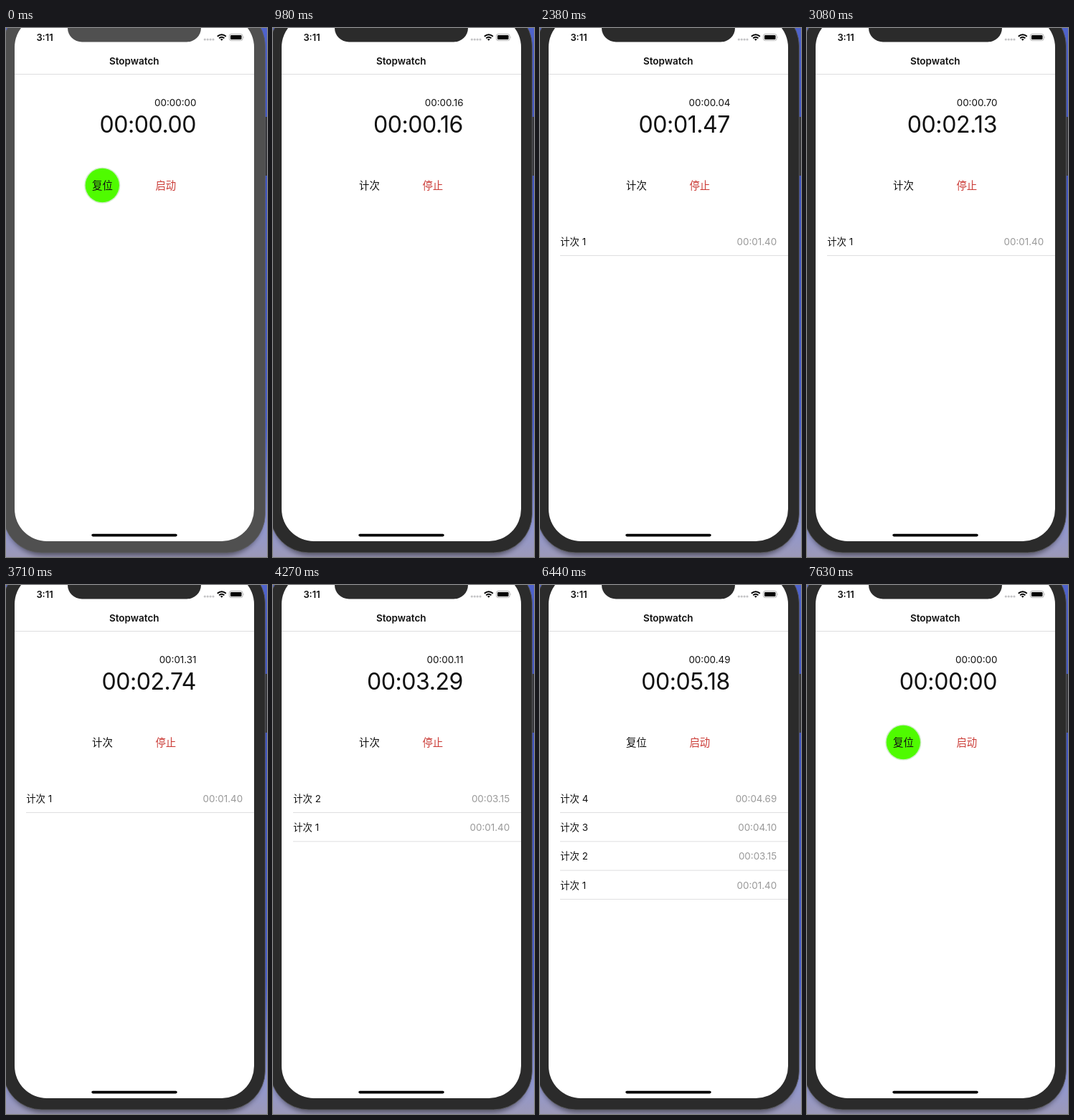
These frames come from a looping animation (364x738 px, 8 s). An HTML page:

```html
<!DOCTYPE html>
<html lang="zh-CN">
<head>
<meta charset="utf-8">
<title>Stopwatch</title>
<style>
  html, body { margin: 0; width: 100%; height: 100%; overflow: hidden; }
  svg { display: block; width: 364px; height: 738px; }
  text { font: 13.4px Inter, "Noto Sans CJK SC", "Noto Sans CJK", sans-serif; fill: #111; }
  .bold { font-weight: 600; text-anchor: middle; }
  .end { text-anchor: end; }
  #total { font-size: 32px; letter-spacing: -.42px; }
  .button { font-size: 14.4px; text-anchor: middle; }
  #right { fill: #cb3b36; }
  .row .end { fill: #999; }
  .line { stroke: #dedee0; stroke-width: 1; }
</style>
</head>
<body>
<svg viewBox="0 0 364 738">
  <defs>
    <linearGradient id="sky" x2="0" y2="1">
      <stop offset="0" stop-color="#4f63cc"/>
      <stop offset=".25" stop-color="#4055c0"/>
      <stop offset=".75" stop-color="#4a60cc"/>
      <stop offset=".94" stop-color="#9097d2"/>
      <stop offset="1" stop-color="#9c99b8"/>
    </linearGradient>
    <filter id="blur"><feGaussianBlur stdDeviation="3.5"/></filter>
  </defs>
  <rect width="364" height="738" fill="url(#sky)"/>
  <rect x="0" y="-20" width="357" height="756" rx="52" opacity=".45" filter="url(#blur)"/>
  <rect x="360" y="124" width="6" height="82" rx="1" fill="#37373b"/>

  <g id="bezel">
    <rect x="-4" y="-29" width="365.4" height="761" rx="54" stroke="#606064" stroke-width=".8"/>
    <rect x="12" y="-18" width="334" height="734" rx="45" fill="#fff"/>
    <path d="M86 -2V0A20 19.5 0 0 0 106 19.5H252A20 19.5 0 0 0 272 0V-2Z"/>
  </g>

  <text class="bold" x="54" y="17.5" style="font-size:12.9px">3:11</text>
  <g fill="#c4c4c6">
    <circle cx="277.3" cy="16" r="1.6"/><circle cx="281.2" cy="16" r="1.6"/>
    <circle cx="285.1" cy="16" r="1.6"/><circle cx="289" cy="16" r="1.6"/>
  </g>
  <g fill="none" stroke="#000" stroke-width="2">
    <path d="M294.8 11.8Q300.8 6.6 306.8 11.8"/>
    <path d="M297.2 14.2Q300.8 11.2 304.4 14.2"/>
  </g>
  <path d="M298.9 15.8Q300.8 14.3 302.7 15.8L300.8 17.8Z"/>
  <rect x="311.5" y="8.5" width="18.5" height="9" rx="2.5" fill="none" stroke="#b0b0b0"/>
  <rect x="313" y="10" width="15.5" height="6" rx="1.2"/>
  <path d="M331 11.5q1.5 1.5 0 3z" fill="#b0b0b0"/>

  <text class="bold" x="178.8" y="51.2" style="font-size:13.5px">Stopwatch</text>
  <path class="line" d="M12 64.5H346"/>

  <text class="end" id="lap" x="265.5" y="109.1"></text>
  <text class="end" id="total" x="265" y="145.6"></text>

  <g id="disc">
    <circle cx="134.3" cy="219.5" r="24.4" fill="none" stroke="#cdebc6" stroke-width="1.4"/>
    <circle cx="134.3" cy="219.5" r="23.7" fill="#4ffb00"/>
  </g>
  <text class="button" id="left" x="134.4" y="225"></text>
  <text class="button" id="right" x="222.8" y="225"></text>

  <g id="rows"></g>
  <rect x="119.3" y="705.7" width="119.4" height="3.7" rx="1.8"/>
</svg>
<script>
  const LOOP = 8000, STEP = 70, START = 805, STOP = 6440, RESET = 7210;
  // [time in ms, stopwatch reading in s]
  const PACE = [[START, 0], [1750, .88], [3080, 2.13], [4270, 3.29], [5460, 4.38], [STOP, 5.18]];
  // recorded reading, and the reading at which the lap timer restarts
  const LAPS = [[1.40, 1.43], [3.15, 3.18], [4.10, 4.10], [4.69, 4.69]];
  const ROW = 40.3;
  const $ = id => document.getElementById(id);

  const pad = n => String(n).padStart(2, '0');
  function clock(s) {
    const c = Math.max(0, Math.round(s * 100));
    return `${pad(Math.floor(c / 6000))}:${pad(Math.floor(c / 100) % 60)}.${pad(c % 100)}`;
  }

  function reading(t) {
    if (t <= START) return 0;
    for (let i = 1; i < PACE.length; i++) {
      const [t0, s0] = PACE[i - 1], [t1, s1] = PACE[i];
      if (t <= t1) return s0 + (s1 - s0) * (t - t0) / (t1 - t0);
    }
    return PACE[PACE.length - 1][1];
  }

  function listRows(count) {
    let out = '';
    for (let i = 0; i < count; i++) {
      const n = count - i;
      out += `<g class="row" transform="translate(0 ${i * ROW})">
        <text x="28.2" y="302.7">计次 ${n}</text>
        <text class="end" x="330.2" y="302.7">${clock(LAPS[n - 1][0])}</text>
        <path class="line" d="M28 317.5H346"/></g>`;
    }
    return out;
  }

  let shown = -1;
  function render(now) {
    const t = Math.floor((now % LOOP + .5) / STEP) * STEP;
    if (t !== shown) draw(shown = t);
    requestAnimationFrame(render);
  }

  function draw(t) {
    const reset = t >= RESET, idle = t < START || reset, running = !idle && t < STOP;
    const s = reading(t);
    const count = idle ? 0 : LAPS.filter(l => s >= l[0]).length;
    const since = count ? LAPS[count - 1][1] : 0;

    $('total').textContent = reset ? '00:00:00' : clock(s);
    $('lap').textContent = idle ? '00:00:00' : clock(s - since);
    $('disc').style.display = idle ? '' : 'none';
    $('left').textContent = running ? '计次' : '复位';
    $('right').textContent = running ? '停止' : '启动';
    $('rows').innerHTML = listRows(count);

    const dim = Math.min(1, Math.max(0, t / 420));
    const g = Math.round(80 - 37 * dim);
    $('bezel').setAttribute('fill', `rgb(${g},${g},${g})`);
  }

  requestAnimationFrame(render);
</script>
</body>
</html>
```
